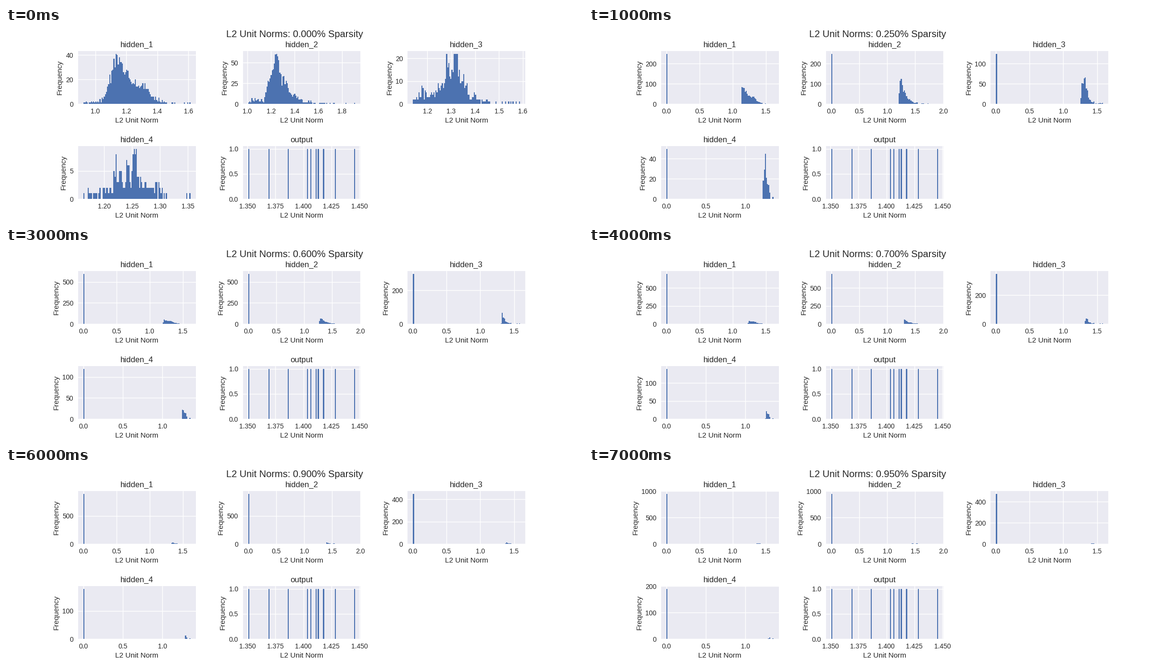
Animation, 1200 px wide and 400 px high, one loop 8 s. Source, as a matplotlib script:

```python
import matplotlib.pyplot as plt
import numpy as np
from matplotlib.animation import FuncAnimation

BINS = 100
BLUE = "#4C72B0"
INK = "0.15"
SPARSITY = [0, 0.25, 0.5, 0.6, 0.7, 0.8, 0.9, 0.95]

plt.rcParams.update({
    "font.family": "Liberation Sans",
    "text.color": INK,
    "axes.labelcolor": INK,
    "axes.facecolor": "#EAEAF2",
    "axes.edgecolor": "white",
    "axes.linewidth": 0,
    "axes.grid": True,
    "axes.axisbelow": True,
    "axes.titlesize": 12,
    "axes.labelsize": 11,
    "axes.ymargin": 0.053,
    "grid.color": "white",
    "grid.linestyle": "-",
    "grid.linewidth": 1,
    "lines.solid_capstyle": "round",
})
for side, pad in (("xtick", 6.3), ("ytick", 7)):
    plt.rcParams.update({
        f"{side}.color": INK,
        f"{side}.labelsize": 10,
        f"{side}.major.size": 0,
        f"{side}.major.pad": pad,
    })

# Each layer: unit count, norm range, key points (bin, height) of its outline.
LAYERS = {
    "hidden_1": (1000, 0.924, 1.613, [
        (0, 0.5), (8, 2), (12, 0.5), (17, 4), (22, 13), (26, 27), (30, 41),
        (36, 30), (42, 23), (48, 15), (57, 15), (63, 6), (72, 2), (80, 0.5),
        (99, 0.2)]),
    "hidden_2": (1000, 1.007, 1.911, [
        (0, 2), (4, 6), (14, 5), (18, 24), (22, 36), (26, 61), (30, 40),
        (35, 25), (39, 13), (44, 10), (52, 3), (58, 3), (62, 0.5), (99, 0.1)]),
    "hidden_3": (500, 1.1396, 1.588, [
        (0, 2), (9, 7), (13, 4), (19, 4), (29, 10), (31, 16), (36, 15),
        (39, 22), (42, 16), (46, 10), (50, 8), (53, 3), (70, 1.2), (72, 0.3),
        (99, 0.5)]),
    "hidden_4": (200, 1.163, 1.3547, [
        (0, 0.5), (14, 1.3), (23, 2.3), (32, 6), (43, 4.5), (47, 9), (51, 4),
        (60, 3), (73, 1.2), (78, 0.4), (99, 0.3)]),
}
OUTPUT_BINS = np.array([0, 19.5, 37.5, 55.5, 58.5, 63.5, 65.5, 70.5, 81.5, 100])


def bin_counts(size, outline, rng):
    """Interpolate the outline, roughen it, and make it add up to size."""
    at, height = np.array(outline).T
    shape = np.interp(np.arange(BINS), at, height)
    rough = shape + 0.6 * np.sqrt(shape) * rng.normal(size=BINS)
    peak = shape.argmax()
    counts = np.rint(rough.clip(0, shape[peak])).astype(int)
    counts[peak] = shape[peak]
    counts[[0, -1]] = counts[[0, -1]].clip(1)
    while counts.sum() != size:
        free = np.flatnonzero((counts > 2) & (counts < counts[peak] - 1))
        counts[rng.choice(free)] += np.sign(size - counts.sum())
    return counts


def make_norms(size, low, high, outline, rng):
    """Sorted norms that fill the bins between low and high."""
    width = (high - low) / BINS
    counts = bin_counts(size, outline, rng)
    norms = np.concatenate([low + width * (i + (np.arange(n) + 0.5) / n)
                            for i, n in enumerate(counts) if n])
    norms[0], norms[-1] = low, high
    return norms


rng = np.random.default_rng(4)
norms = {name: make_norms(*spec, rng) for name, spec in LAYERS.items()}
norms["output"] = 1.3507 + 0.0955 * OUTPUT_BINS / BINS

fig = plt.figure(figsize=(12, 4), dpi=100, facecolor="white")
fig.subplots_adjust(left=0.125, right=0.9, bottom=0.11, top=0.88,
                    wspace=0.4, hspace=0.8)
axes = {name: fig.add_subplot(2, 3, i + 1) for i, name in enumerate(norms)}
heading = fig.text(0.5, 0.9525, "", size=14.4, ha="center", va="baseline")


def draw(step):
    sparsity = SPARSITY[step]
    heading.set_text(f"L2 Unit Norms: {sparsity:.3f}% Sparsity")
    for name, ax in axes.items():
        values = norms[name].copy()
        if name != "output":
            values[:round(sparsity * len(values))] = 0
        ax.clear()
        ax.hist(values, bins=BINS, color=BLUE)
        ax.set(title=name, xlabel="L2 Unit Norm", ylabel="Frequency")


anim = FuncAnimation(fig, draw, frames=len(SPARSITY), init_func=lambda: None,
                     interval=1000, repeat=True, repeat_delay=0)
plt.show()
```
